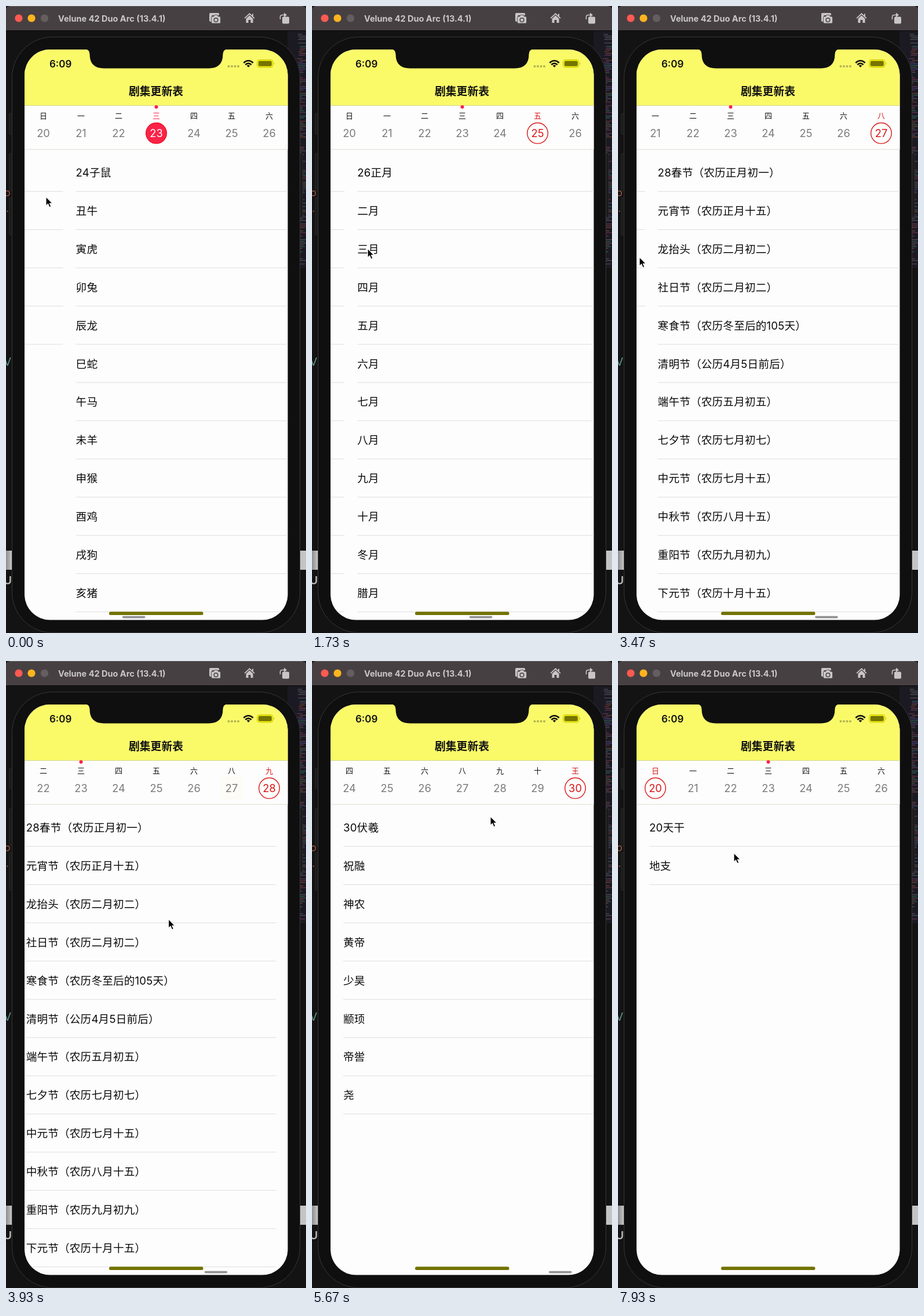
An HTML page for the animation above (8 s loop, 518 px wide and 1081 px high).

```html
<!DOCTYPE html>
<html lang="zh-CN">
<head>
<meta charset="utf-8">
<title>剧集更新表</title>
<style>
  html, body { margin: 0; width: 100%; height: 100%; overflow: hidden; background: #131314; }
  svg { display: block; width: 100vw; height: 100vh; }
  text { font-family: Inter, "Noto Sans CJK SC", "Noto Sans CJK", sans-serif; }
  .row { font-size: 18.6px; letter-spacing: .2px; fill: #0a0a0a; }
  .rule { stroke: #dddee0; stroke-width: 1; }
  .cell { text-anchor: middle; }
  .day { font-size: 13px; fill: #111; }
  .num { font-size: 18.3px; fill: #7b7b7b; }
  .ring { fill: none; stroke: none; stroke-width: 1.4; }
  .flash { fill: #fffb69; opacity: 0; }
  .picked .day, .picked .num { fill: #da1616; }
  .picked .ring { stroke: #da1616; }
  .picked.today .day { fill: #fb2347; }
  .picked.today .num { fill: #fff; }
  .picked.today .ring { fill: #fb2347; stroke: #ec1226; }
</style>
</head>
<body>
<svg viewBox="0 0 518 1081" preserveAspectRatio="none">
  <defs>
    <clipPath id="screen"><rect x="32" y="75" width="454.500" height="983.500" rx="44"/></clipPath>
    <linearGradient id="strip"><stop offset="0" stop-color="#8d8d8d"/><stop offset="1" stop-color="#d2d2d2"/></linearGradient>
  </defs>

  <!-- desktop behind the device -->
  <rect width="518" height="1081" fill="#131314"/>
  <rect x="486" y="42" width="32" height="410" fill="#1b1a22"/>
  <g id="minimap"></g>
  <rect y="939" width="12" height="33" fill="url(#strip)"/>
  <rect x="506" y="939" width="12" height="33" fill="#c4c4c4"/>
  <g font-size="18" fill="#a4593c"><text x="-3" y="328">o</text><text y="355">.</text></g>
  <text x="-4" y="620" font-size="19" fill="#5f9c90">V</text>
  <text x="-4" y="997" font-size="19" font-weight="600" fill="#bdbdbd">U</text>

  <!-- device body -->
  <g fill="#1b1b1b" stroke="#2e2e2e" stroke-width=".8">
    <rect x="5.500" y="185" width="8" height="36" rx="2"/>
    <rect x="5.500" y="254" width="8" height="65" rx="2"/>
    <rect x="5.500" y="330" width="8" height="65" rx="2"/>
    <rect x="504" y="254" width="8" height="110" rx="2"/>
  </g>
  <rect x="10.500" y="53.500" width="497" height="1027" rx="70" fill="#0f0f0f" stroke="#373737"/>

  <!-- window bar -->
  <path d="M0 42V7Q0 0 7 0H511Q518 0 518 7V42Z" fill="#474042"/>
  <path d="M6 .5H512" stroke="#6d6668"/>
  <path d="M0 42.500H518" stroke="#050505"/>
  <circle cx="22" cy="21" r="6.600" fill="#ff5a52"/>
  <circle cx="44" cy="21" r="6.600" fill="#fdb41f"/>
  <circle cx="66.500" cy="21" r="6.600" fill="#645e60"/>
  <text x="90" y="26.500" font-size="14.500" font-weight="700" fill="#cbc7c8">Velune 42 Duo Arc (13.4.1)</text>
  <g fill="#c9c5c6">
    <path d="M353 12h13q2 0 2 2v2h-11q-2 0-2 2v9h-2q-2 0-2-2V14q0-2 2-2Z"/>
    <path d="M356 18h2.500l1.500-2.500h5l1.500 2.500h2q2 0 2 2v8q0 2-2 2h-12q-2 0-2-2v-8q0-2 1.500-2Z" stroke="#474042" stroke-width=".8"/>
    <circle cx="362.500" cy="24" r="3.300" fill="none" stroke="#474042" stroke-width="1.500"/>
    <path d="M420.500 12l9 8.500-1.300 1.300-7.700-7.300-7.700 7.300-1.300-1.300Z"/>
    <path d="M414.500 22l6-5.700 6 5.700v7h-4v-5h-4v5h-4Z"/>
    <rect x="425" y="13.500" width="2" height="4"/>
    <rect x="477" y="18.500" width="12" height="12" rx="2"/>
    <path d="M473.500 23v-4q0-3.500 3.500-3.500h4" fill="none" stroke="#c9c5c6" stroke-width="1.600"/>
    <path d="M480 11.500l5 4-5 4Z"/>
  </g>

  <g clip-path="url(#screen)">
    <rect x="32" y="75" width="455" height="984" fill="#fdfdfd"/>
    <g id="pages"></g>
    <rect x="32" y="171" width="455" height="76" fill="#fdfdfd"/>
    <g id="week"></g>
    <path d="M32 247.200H487" stroke="#dcddd3"/>
    <rect x="32" y="75" width="455" height="96.500" fill="#fafa69"/>
    <path d="M32 171.500H487" stroke="#d5d58a"/>
    <circle id="dot" cy="174" r="3" fill="#fb2347"/>
    <text x="259" y="154" font-size="18.800" font-weight="700" text-anchor="middle" fill="#111">剧集更新表</text>
    <text x="75" y="105.800" font-size="17" font-weight="600" fill="#111">6:09</text>
    <path d="M384.500 104H402" stroke="#b3b352" stroke-width="4" stroke-linecap="round" stroke-dasharray="0 5.500"/>
    <g fill="none" stroke="#111" stroke-width="2.600">
      <path d="M410.300 98Q418.500 90.500 426.700 98"/>
      <path d="M413.300 101.300Q418.500 96.600 423.700 101.300"/>
      <path d="M415.600 102.800L418.500 105.800L421.400 102.800Q418.500 100.500 415.600 102.800Z" fill="#111" stroke="none"/>
    </g>
    <rect x="433.500" y="92.500" width="27.500" height="13.500" rx="4" fill="#f4f000" stroke="#d0cc1c"/>
    <rect x="435.800" y="94.800" width="23" height="9" rx="2.200" fill="#747400"/>
    <path d="M462.500 97q2 2.200 0 4.500Z" fill="#b9b62c"/>
    <rect id="bar" y="1051.800" width="39.500" height="3.600" rx="1.800" fill="#929295"/>
    <rect x="178" y="1044.300" width="162.500" height="5.700" rx="2.850" fill="#737300"/>
  </g>
  <path d="M136 74H383Q374.500 75 374.500 83Q374.500 107.500 350 107.500H169Q144.500 107.500 144.500 83Q144.500 75 136 74Z" fill="#0f0f0f"/>

  <path id="cursor" d="M-1-9V6.500L2.500 3.200L5 9L7.800 7.800L5.300 2.200H10Z" fill="#000" stroke="#fff" stroke-width="1.100"/>
</svg>

<script>
const LOOP = 8000, LEFT = 32, WIDTH = 454, SLOT = 65, ROW = 65.9;
const FIRST = 20, TODAY = 23;
const DAYS = '日一二三四五六八九十王';
const LISTS = {
  20: '天干 地支',
  23: '金 木 水 火 土',
  24: '子鼠 丑牛 寅虎 卯兔 辰龙 巳蛇 午马 未羊 申猴 酉鸡 戌狗 亥猪',
  25: '立春 雨水 惊蛰 春分 清明 谷雨 立夏 小满 芒种 夏至 小暑 大暑',
  26: '正月 二月 三月 四月 五月 六月 七月 八月 九月 十月 冬月 腊月',
  27: '春季 夏季 秋季 冬季',
  28: '春节（农历正月初一） 元宵节（农历正月十五） 龙抬头（农历二月初二） 社日节（农历二月初二） ' +
      '寒食节（农历冬至后的105天） 清明节（公历4月5日前后） 端午节（农历五月初五） 七夕节（农历七月初七） ' +
      '中元节（农历七月十五） 中秋节（农历八月十五） 重阳节（农历九月初九） 下元节（农历十月十五）',
  29: '冀 兖 青 徐 扬 荆 豫 益 雍',
  30: '伏羲 祝融 神农 黄帝 少昊 颛顼 帝喾 尧'
};

// Each swipe is a drag over part of a page, then a glide to the next one.
const SWIPES = [-287, 555, 1365, 2175, 3075, 3883, 4511];
const DRAG = 180, GLIDE = 380, SETTLE = DRAG + GLIDE, PULL = .6;
const REWIND = 6250, TAP = 7300;

// Pointer rests: time, x, y.
const RESTS = [
  [0, 70, 338], [1000, 284, 414], [2600, 30, 446], [3470, 38, 442], [4530, 215, 474],
  [5670, 309, 277], [REWIND, 200, 222], [REWIND + 300, 310, 224], [TAP, 65, 222], [7930, 201, 340]
];
const POINTER_Y = RESTS.map(([t, , y]) => [t, y]);
const POINTER_X = RESTS.map(([t, x]) => [t, x])
  .concat(SWIPES.flatMap(s => [[s, 320], [s + DRAG, 50]]))
  .sort((a, b) => a[0] - b[0]);

const $ = id => document.getElementById(id);
const clamp = u => Math.max(0, Math.min(1, u));
const move = (node, x, y = 0) => node.setAttribute('transform', `translate(${x.toFixed(2)} ${y.toFixed(2)})`);
const sum = (list, f) => list.reduce((total, item) => total + f(item), 0);

function smooth(u) {
  u = clamp(u);
  return u < .5 ? 2 * u * u : 1 - 2 * (1 - u) ** 2;
}

function swipe(age) {
  if (age < DRAG) return PULL * clamp(age / DRAG) ** 2;
  return 1 - (1 - PULL) * (1 - clamp((age - DRAG) / GLIDE)) ** 3;
}

function along(points, t) {
  const i = points.findLastIndex(p => p[0] <= t);
  const [start, from] = points[i];
  const [end, to] = points[i + 1] || [start + 1, from];
  return from + (to - from) * smooth((t - start) / (end - start));
}

function add(parent, tag, attrs, text) {
  const node = document.createElementNS('http://www.w3.org/2000/svg', tag);
  for (const name in attrs) node.setAttribute(name, attrs[name]);
  if (text) node.textContent = text;
  return parent.appendChild(node);
}

function buildMinimap() {
  let seed = 7;
  const random = () => (seed = seed * 16807 % 2147483647) / 2147483647;
  const tints = ['#7c4a38', '#4a4a86', '#6b3a66', '#35685f', '#555560', '#743347'];
  for (let y = 45; y < 450; y += 3) {
    if (random() < .2) continue;
    add($('minimap'), 'rect', {
      x: 502 + random() * 6, y, width: 5 + random() * 12, height: 1.4,
      fill: tints[Math.floor(random() * tints.length)], opacity: .8
    });
  }
}

function buildPage(date) {
  const page = add($('pages'), 'g', {});
  LISTS[date].split(' ').forEach((name, i) => {
    const y = 319.6 + ROW * i;
    add(page, 'text', { class: 'row', x: 22, y: y - 25.6 }, i ? name : date + name);
    add(page, 'path', { class: 'rule', d: `M22 ${y}H${WIDTH}` });
  });
  return { date: +date, page };
}

function buildCell(day, i) {
  const date = FIRST + i;
  const cell = add($('week'), 'g', {});
  const flash = add(cell, 'g', { class: 'flash' });
  add(flash, 'rect', { x: -20, y: 199, width: 40, height: 40 });
  add(flash, 'circle', { cy: 219.3, r: 17.8, fill: 'none', stroke: '#dfb63a', 'stroke-width': 1.4 });
  add(cell, 'circle', { class: 'ring', cy: 219.3, r: 17.8 });
  add(cell, 'text', { class: 'day', y: 194 }, day);
  add(cell, 'text', { class: 'num', y: 226 }, String(date));
  return { date, cell, flash };
}

buildMinimap();
const pages = Object.keys(LISTS).map(buildPage);
const cells = [...DAYS].map(buildCell);

function draw(t) {
  const tapped = t >= TAP;
  const settled = SWIPES.map(s => s + SETTLE).filter(s => s <= t);
  const picked = tapped ? FIRST : TODAY + settled.length;
  const page = tapped ? FIRST : TODAY + sum(SWIPES, s => swipe(t - s));

  // Past the seventh day, every new pick pushes the week on by one slot.
  const pushes = settled.slice(3);
  const scroll = sum(pushes, s => smooth((t - s) / 300)) - pushes.length * smooth((t - REWIND) / 600);
  const slotX = date => 64.5 + SLOT * (date - FIRST - scroll);

  for (const p of pages) {
    const shift = p.date - page;
    p.page.style.display = Math.abs(shift) < 1 ? '' : 'none';
    move(p.page, LEFT + shift * WIDTH);
  }
  for (const c of cells) {
    move(c.cell, slotX(c.date));
    c.cell.setAttribute('class', 'cell' + (c.date === picked ? ' picked' : '') + (c.date === TODAY ? ' today' : ''));
    c.flash.style.opacity = c.date === picked - 1 ? 1 - clamp((t - settled.at(-1)) / 300) ** 3 || 0 : 0;
  }
  $('dot').setAttribute('cx', slotX(TODAY));
  $('bar').setAttribute('x', 409 + (page - 30) * 33.85);
  $('bar').style.opacity = 1 - clamp((t - 5800) / 250);
  move($('cursor'), along(POINTER_X, t), along(POINTER_Y, t));
}

const begin = performance.now();
function tick() {
  draw((performance.now() - begin) % LOOP);
  requestAnimationFrame(tick);
}
tick();
</script>
</body>
</html>
```
